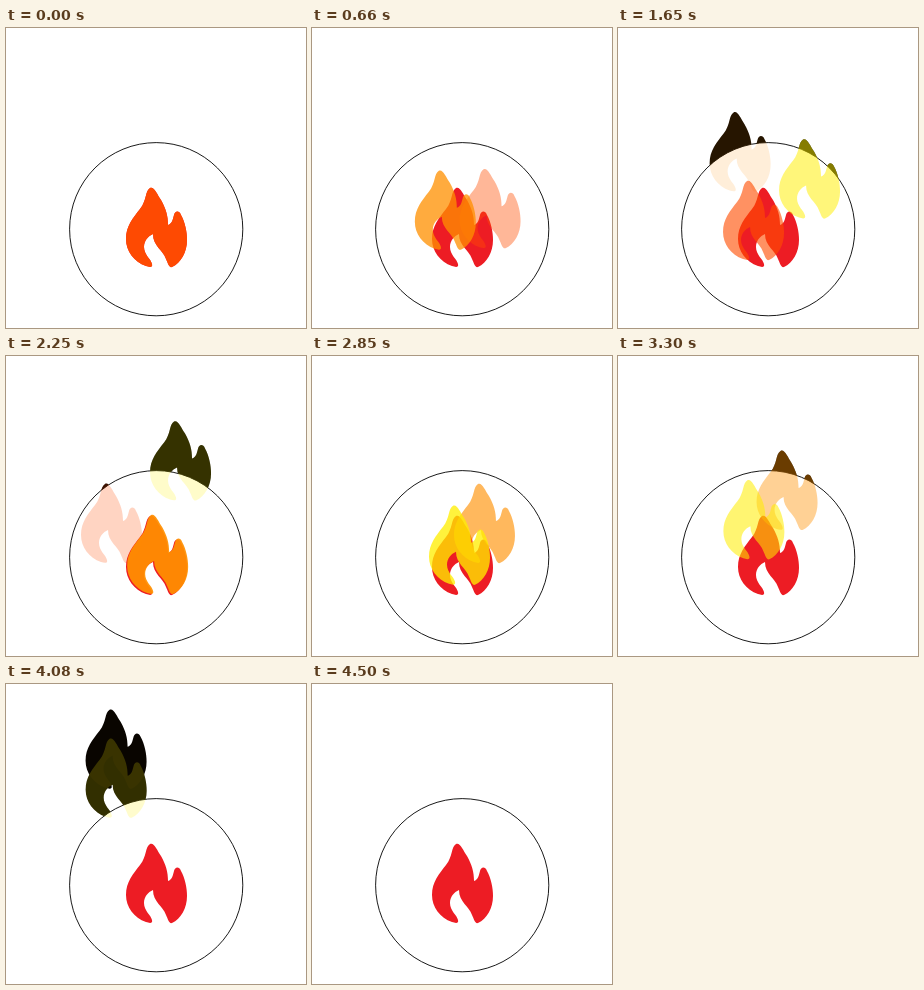
An HTML page with a canvas for the animation above (4530 ms loop, 300x300 px).

```html
<!DOCTYPE html>
<html lang="en">
<head>
<meta charset="utf-8">
<title>Rising flames</title>
<style>
html, body { margin: 0; height: 100%; overflow: hidden; background: #fff; }
canvas { display: block; width: 300px; height: 300px; }
</style>
</head>
<body>
<canvas id="stage" width="300" height="300"></canvas>
<script>
const LOOP = 4530, STEP = 30;
const RED = '#ed1c24', CORAL = '#ff4d00', ORANGE = '#ff9000', YELLOW = '#ffee00';
const ctx = document.getElementById('stage').getContext('2d');

const flameShape = new Path2D(`M144 160C148 158 151 166 155 172C160 181 162 188 162 197
  C166 196 167 191 168 187C169 183 173 182 175 187C179 194 181 204 181 212
  C181 224 175 235 166 239C163 240 162 235 160 231C157 222 147 218 147 206
  C142 208 138 213 138 219C138 227 145 231 146 236C147 240 143 239 140 238
  C128 234 120 223 120 211C120 198 127 190 134 181C141 172 139 163 144 160Z`);

// ease is the exponent of the rise; sway holds the cubic coefficients of x
const flames = [
  { color: CORAL,  start: 0,    life: 1150, rise: 57,  ease: 2,    sway: [110, -80, 0] },
  { color: ORANGE, start: 350,  life: 1540, rise: 90,  ease: 1.03, sway: [-106, 86, 0] },
  { color: YELLOW, start: 830,  life: 1820, rise: 128, ease: 1.22, sway: [110, 102, -280] },
  { color: CORAL,  start: 1125, life: 1500, rise: 57,  ease: 2,    sway: [-134, 96, 0] },
  { color: ORANGE, start: 2200, life: 1950, rise: 141, ease: 1.35, sway: [162, -310, 100] },
  { color: YELLOW, start: 2450, life: 2050, rise: 154, ease: 1.66, sway: [-35, -165, 190] },
];

function drawFlame(x, y, color, alpha = 1) {
  ctx.save();
  ctx.translate(x, y);
  ctx.globalAlpha = alpha;
  ctx.fillStyle = color;
  ctx.fill(flameShape);
  ctx.restore();
}

function pose({ color, start, life, rise, ease, sway: [a, b, c] }, time) {
  const p = (time - start) / life;
  const s = p ** ease;
  return { x: s * (a + s * (b + s * c)), y: -rise * s, color, alpha: 0.95 * (1 - p) };
}

function draw(time) {
  const alive = flames
    .filter(f => time >= f.start && time < f.start + f.life)
    .map(f => pose(f, time));

  ctx.fillStyle = '#fff';
  ctx.fillRect(0, 0, 300, 300);

  // Outside the disc the flames fade to black, inside it to white
  alive.forEach(f => drawFlame(f.x, f.y, '#000'));
  ctx.beginPath();
  ctx.arc(150.2, 201.2, 86.6, 0, 2 * Math.PI);
  ctx.fill();
  ctx.lineWidth = 0.9;
  ctx.strokeStyle = '#000';
  ctx.stroke();

  drawFlame(0, 0, RED);
  alive.forEach(f => drawFlame(f.x, f.y, f.color, f.alpha));
}

function tick() {
  const time = performance.now() % LOOP;
  draw(Math.floor(time / STEP) * STEP);
  requestAnimationFrame(tick);
}
tick();
</script>
</body>
</html>
```
